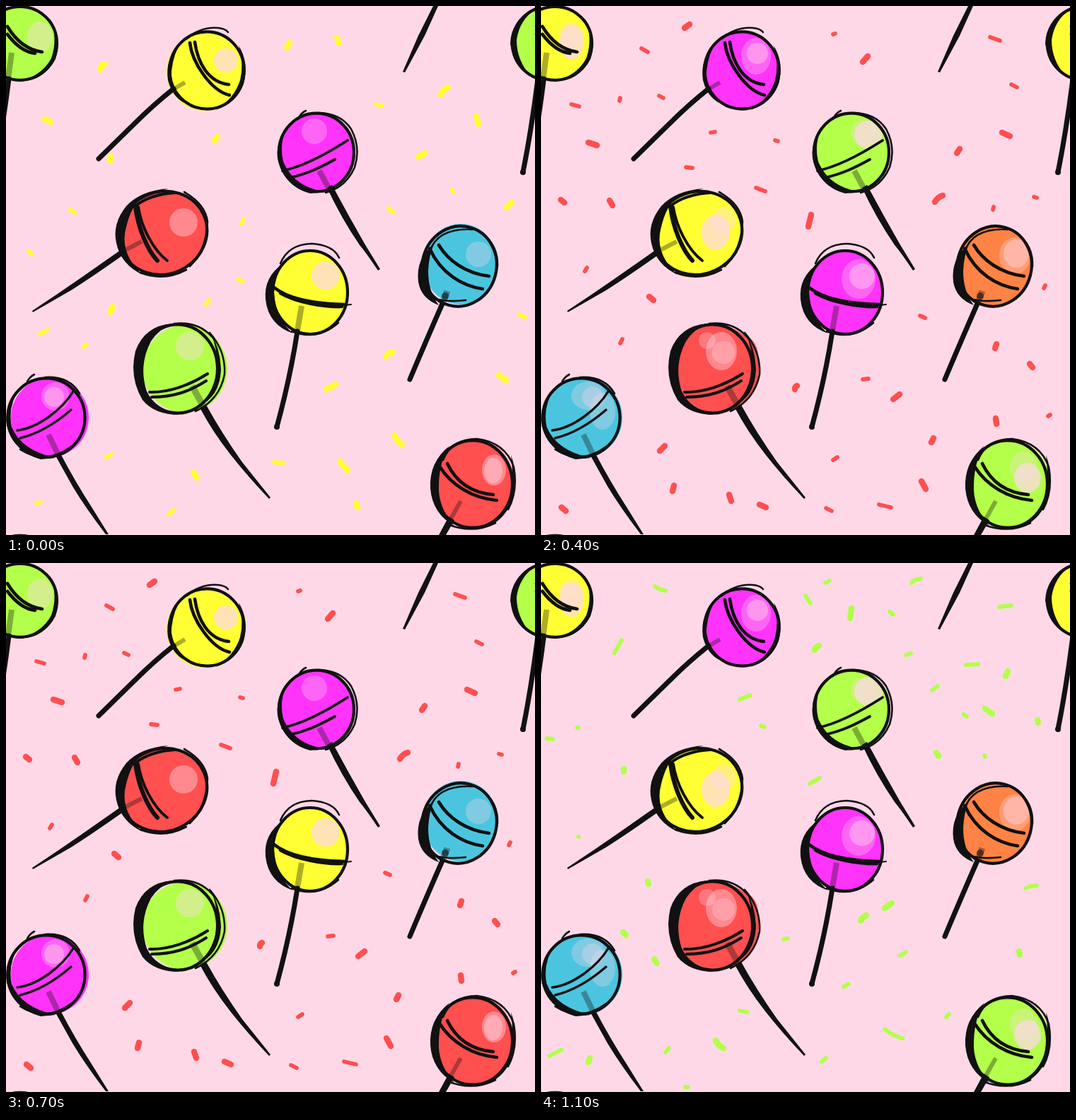
An HTML page that plays this animation: 748 by 748 pixels, repeating every 1200 ms.

```html
<!DOCTYPE html>
<html lang="en">
<head>
<meta charset="utf-8">
<title>Lollipops</title>
<style>
  html, body { margin: 0; width: 100%; height: 100%; overflow: hidden; background: #ffd8e8; }
  svg { display: block; width: 100vw; height: 100vh; }

  .y { --c: #ffff33 } .m { --c: #ff33fa } .r { --c: #ff4f4f }
  .g { --c: #b3ff4a } .b { --c: #4bc5df } .o { --c: #ff8344 }
  .candy use, .candy ellipse { fill: var(--c); }
  .candy .h { fill: #ffd8e8; opacity: .42; }
  .candy .s { fill: #ffd8e8; opacity: .72; }
  .candy .l { fill: #ffd8e8; opacity: .3; }

  .sprinkles { fill: none; stroke: var(--c); stroke-linecap: round; }
  .thick { stroke-width: 8.4; }
  .thin { stroke-width: 5.8; }

  /* each layer shows for one third of its cycle */
  .candy, .sprinkles { visibility: hidden; animation: turn 600ms step-end infinite; }
  .sprinkles { animation-duration: 300ms; }
  .candy.second { animation-delay: -400ms; }
  .candy.third { animation-delay: -200ms; }
  .sprinkles.second { animation-delay: -200ms; }
  .sprinkles.third { animation-delay: -100ms; }
  @keyframes turn {
    0% { visibility: visible; }
    33.3333% { visibility: hidden; }
    100% { visibility: hidden; }
  }

  .line { fill: none; stroke: #111; stroke-linecap: round; stroke-linejoin: round; }
  .solid { fill: #111; }
  .inside { fill: none; stroke: #111; opacity: .34; }
</style>
</head>
<body>
<svg viewBox="0 0 748 748">
  <defs>
    <ellipse id="c1" cx="284" cy="91" rx="54" ry="55"/>
    <ellipse id="c2" cx="440" cy="208" rx="53" ry="55"/>
    <ellipse id="c3" cx="222" cy="321" rx="63" ry="58" transform="rotate(-25 222 321)"/>
    <ellipse id="c4" cx="429" cy="405" rx="54" ry="59"/>
    <ellipse id="c5" cx="641" cy="368" rx="53" ry="57"/>
    <ellipse id="c6" cx="247" cy="513" rx="60" ry="62"/>
    <ellipse id="c7" cx="58" cy="582" rx="55" ry="56"/>
    <ellipse id="c8" cx="662" cy="676" rx="57" ry="62"/>
    <ellipse id="c9" cx="21" cy="52" rx="52" ry="52"/>
  </defs>
  <rect width="748" height="748" fill="#ffd8e8"/>

  <g class="sprinkles first y">
    <path class="thick" d="M133 90q0-6 6-8M397 59l4-7M468 45l3 7M55 160l8 4M147 219l1-6M295 190l4-5M615 125q3-7 10-10M665 156l3 11M583 213l9-5M708 285l7-7M147 433l4-8M537 496q4-6 10-7M697 522l10 7M549 607q3 7 11 13M472 644l11 13M265 659l5 8M495 703l2 6M453 542l13-7"/>
    <path class="thin" d="M523 139l9 2M630 260l3 3M541 286l7 6M91 288l6 4M333 308l3-6M32 346l4 5M328 386l7 4M283 422l4-6M47 464l12-6M110 482l4-3M725 436l9 4M142 638l7-4M379 645l13 1M230 719l7-6M43 704l6-3"/>
  </g>
  <g class="sprinkles second r">
    <path class="thick" d="M203 31l7-5M455 79l7-8M67 193l12 4M652 179l11 5M588 208l4-6M28 274l5 4M97 275l4 7M557 277q4-7 11-9M378 312l4-17M153 411l6 5M642 484l2-6M691 506l4 5M359 542q0-4 3-5M498 556l9-7M643 583l1 8M552 617l3-6M168 629l7-7M538 672l6 11M186 686l2-8M266 691l3 9M309 705l9 4M29 709l6 5"/>
    <path class="thin" d="M142 60l9 5M413 40l3-1M635 44l14 5M665 111l8 4M43 139l11 3M111 134l1-4M167 127l6 3M240 179l6-1M331 190l4 1M205 228l9 1M304 257l13 5M640 284l-1 4M697 270l4 1M62 375l3-5M711 399l2-4M536 438l7 3M112 477l3-6M455 528l8-1M717 580l3-2M413 642l6-4M478 705l17 4M403 710l8 4"/>
  </g>
  <g class="sprinkles third g">
    <path class="thick" d="M437 78l2-14M387 123q1-5 6-6M657 160l3-7M628 206l10 7M702 222l1 4M559 268l3 5M452 506q3-6 8-8M486 488l10-7M151 450l1 4M116 522l4 4M160 560l4 6M676 549l1 5M247 675q3 7 11 11M67 706l2-6M117 291l0 4"/>
    <path class="thin" d="M161 33q6 5 15 6M104 127l10-18M374 46l7 11M402 28l6-3M493 69l5 4M524 28q3-5 13-6M516 130l7-2M648 62l17-2M601 144l17-1M553 180l8-6M597 214l5 3M281 193l15-6M311 230l5 2M51 233l2 0M8 248l9 1M627 272l1 2M380 312l14-8M53 387l.3 0M685 460q8-4 16-4M343 532l6-1M508 555l8-5M428 599l7-4M281 633l11 2M573 642l4-4M486 659q12 10 26 13M12 697l17-9M176 692l5-6M397 705l6-5M204 741l4 0"/>
  </g>

  <g class="candy first">
    <g id="a">
      <use href="#c1" class="y" x="-3" y="2"/><circle class="s" cx="311" cy="77" r="17"/>
      <use href="#c2" class="m"/><circle class="l" cx="436" cy="177" r="18"/>
      <use href="#c3" class="r" x="2"/><circle class="h" cx="251" cy="306" r="20"/>
      <use href="#c4" class="y"/><circle class="s" cx="452" cy="381" r="20"/>
      <use href="#c5" class="b" x="2" y="-3"/><circle class="l" cx="668" cy="351" r="18"/>
      <use href="#c6" class="g" x="6"/><circle class="h" cx="260" cy="481" r="20"/>
      <use href="#c7" class="m" x="4"/><circle class="l" cx="70" cy="552" r="20"/><circle class="h" cx="68" cy="553" r="14"/>
      <use href="#c8" class="r" x="-1" y="-2"/><ellipse class="h" cx="690" cy="656" rx="17" ry="22"/><ellipse class="h" cx="689" cy="657" rx="13" ry="18"/>
      <use href="#c9" class="g"/><ellipse class="h" cx="48" cy="44" rx="18" ry="22"/>
    </g>
    <use href="#a" x="748"/>
  </g>
  <g class="candy second">
    <g id="b">
      <use href="#c1" class="m" x="-4" y="-1"/><ellipse class="s" cx="311" cy="86" rx="17" ry="23"/>
      <use href="#c2" class="o" y="-1"/><ellipse class="h" cx="445" cy="176" rx="22" ry="18"/><ellipse class="h" cx="443" cy="176" rx="16" ry="15"/>
      <use href="#c3" class="g"/><ellipse class="h" cx="252" cy="311" rx="20" ry="27"/><ellipse class="h" cx="253" cy="320" rx="17" ry="18"/>
      <use href="#c4" class="b"/><ellipse class="b" cx="430" cy="365" rx="40" ry="28"/><ellipse class="l" cx="453" cy="386" rx="22" ry="28"/><circle class="l" cx="442" cy="371" r="12"/>
      <use href="#c5" class="g" x="-1" y="6"/><ellipse class="s" cx="667" cy="355" rx="18" ry="23"/>
      <use href="#c6" class="o" x="4"/><circle class="h" cx="252" cy="477" r="20"/><circle class="h" cx="256" cy="479" r="15"/>
      <use href="#c7" class="r"/><ellipse class="l" cx="65" cy="550" rx="25" ry="21"/><circle class="h" cx="67" cy="551" r="16"/>
      <use href="#c8" class="y" x="2" y="1"/><ellipse class="s" cx="692" cy="650" rx="19" ry="22"/>
      <use href="#c9" class="r" x="2"/><ellipse class="h" cx="47" cy="43" rx="18" ry="25"/><ellipse class="h" cx="48" cy="45" rx="14" ry="18"/>
    </g>
    <use href="#b" x="748"/>
  </g>
  <g class="candy third">
    <g id="c">
      <use href="#c1" class="m"/><ellipse class="l" cx="304" cy="71" rx="21" ry="26"/><circle class="h" cx="306" cy="67" r="15"/>
      <use href="#c2" class="g"/><circle class="l" cx="456" cy="179" r="18"/><circle class="s" cx="463" cy="182" r="20"/>
      <use href="#c3" class="y" x="2" y="-1"/><ellipse class="h" cx="258" cy="303" rx="17" ry="18"/><ellipse class="s" cx="247" cy="320" rx="20" ry="25"/>
      <use href="#c4" class="m"/><ellipse class="l" cx="449" cy="386" rx="24" ry="28"/><circle class="h" cx="454" cy="382" r="18"/>
      <use href="#c5" class="o"/><ellipse class="l" cx="670" cy="353" rx="22" ry="26"/><ellipse class="h" cx="672" cy="350" rx="18" ry="20"/>
      <use href="#c6" class="r" x="1"/><ellipse class="r" cx="278" cy="495" rx="29" ry="32"/><circle class="l" cx="235" cy="473" r="12"/><ellipse class="h" cx="255" cy="488" rx="22" ry="27"/><circle class="l" cx="258" cy="490" r="16"/>
      <use href="#c7" class="b" x="2"/><ellipse class="l" cx="67" cy="551" rx="24" ry="20"/><ellipse class="l" cx="87" cy="573" rx="18" ry="26"/><circle class="l" cx="73" cy="553" r="15"/>
      <use href="#c8" class="g" x="1"/><ellipse class="l" cx="682" cy="652" rx="19" ry="22"/><ellipse class="s" cx="688" cy="667" rx="19" ry="21"/>
      <use href="#c9" class="y"/><ellipse class="h" cx="43" cy="41" rx="17" ry="18"/><ellipse class="s" cx="43" cy="52" rx="17" ry="24"/>
    </g>
    <use href="#c" x="748"/>
  </g>

  <g id="ink">
    <g class="inside">
      <path stroke-width="6" d="M233 120L253 108M165 347L192 333M643 700L629 725"/>
      <path stroke-width="8" d="M443 233L456 257M418 424L412 459M60 606L73 633M8 66L3 103"/>
      <path stroke-width="9" d="M263 537L279 566M624 403L617 422"/>
    </g>

    <!-- sticks -->
    <g class="line" stroke-width="7">
      <path d="M237 117Q208 140 181 167L131 216"/>
      <path d="M412 460Q402 525 383 595"/>
      <path d="M617 421Q592 478 571 528"/>
      <path d="M4 103Q-5 175-17 235"/>
    </g>
    <g class="solid">
      <path d="M454 257L461 253Q484 296 507 336L529 372L526 374Q510 350 500 338Q474 300 454 257Z"/>
      <path d="M165 343L170 349Q125 381 92 402L38 433L37 431Q72 408 105 385Z"/>
      <path d="M274 568L283 564Q305 604 334 645L374 695L372 697Q340 663 318 635Q292 602 274 568Z"/>
      <path d="M69 634L76 631Q98 673 122 710L145 747L141 747Q112 709 94 679Z"/>
      <path d="M626 722L634 727L622 748H612Z"/>
      <path d="M604 748H611L592 790L564 842L561 841L583 790Z"/>
      <circle cx="383" cy="595" r="4"/><circle cx="-17" cy="235" r="4"/>
      <circle cx="621" cy="410" r="5" opacity=".6"/>
    </g>

    <!-- heavy shadow edges -->
    <g class="solid">
      <path d="M250 48Q224 72 229 105Q235 128 252 137Q232 113 234 92Q237 65 250 48Z"/>
      <path d="M329 56Q344 80 336 110Q326 138 296 147Q323 131 331 105Q337 80 329 56Z"/>
      <path d="M397 171Q379 195 385 220Q396 256 430 265L455 263Q408 258 392 220Q386 195 397 171Z"/>
      <path d="M230 258Q190 261 170 283Q150 308 156 335Q162 365 193 380Q164 353 168 322Q174 288 190 272Q207 264 230 258Z"/>
      <path d="M392 364Q364 383 367 415Q371 451 406 463Q381 443 379 405Q380 382 392 364Z"/>
      <path d="M605 337Q579 357 583 390Q587 414 612 423Q597 404 597 375Q598 352 605 337Z"/>
      <path d="M235 449Q196 452 183 488Q174 525 193 557Q210 578 245 578Q212 571 199 545Q187 508 205 474Q216 457 235 449Z"/>
      <path d="M291 466Q301 491 297 523Q290 551 272 566Q302 553 304 515Q303 484 291 466Z"/>
      <path d="M20 540Q-3 561 1 593Q12 631 49 641L70 639Q21 628 8 595Q2 565 20 540Z"/>
      <path d="M627 622Q598 645 600 682Q603 718 634 735Q610 708 612 676Q613 643 627 622Z"/>
      <path d="M714 635Q727 670 714 703Q702 730 676 738Q706 722 713 690Q718 662 714 635Z"/>
      <path d="M0 5Q-34 20-35 53Q-31 84-6 99Q-26 77-26 48Q-22 20 0 5Z"/>
      <path d="M62 18Q79 43 70 75Q54 106 16 107Q50 100 64 74Q74 45 62 18Z"/>
    </g>

    <!-- outlines -->
    <g class="line" stroke-width="4.2">
      <ellipse cx="284" cy="91" rx="52.6" ry="54.6"/>
      <ellipse cx="439" cy="207" rx="53" ry="55.4"/>
      <ellipse cx="222" cy="321" rx="63" ry="58" transform="rotate(-25 222 321)"/>
      <ellipse cx="430" cy="405" rx="53" ry="59"/>
      <ellipse cx="641" cy="368" rx="52.5" ry="57" transform="rotate(15 641 368)"/>
      <ellipse cx="243" cy="513" rx="56" ry="62.6"/>
      <ellipse cx="57" cy="582" rx="54.6" ry="55.6"/>
      <ellipse cx="660" cy="676" rx="56" ry="61.6"/>
      <ellipse cx="20" cy="52.8" rx="52" ry="52"/>
    </g>
    <g class="line" stroke-width="2.6">
      <path d="M256 46Q275 29 300 31Q310 32 314 37"/>
      <path d="M413 160Q417 151 424 148M440 151Q473 151 488 174Q502 200 493 228Q481 256 452 264"/>
      <path d="M252 263Q282 280 285 305Q283 346 260 368M190 377Q223 390 255 373"/>
      <path d="M388 364Q399 337 432 336Q463 338 471 356M404 460Q440 474 470 448"/>
      <path d="M599 347Q611 313 660 316M606 414Q626 419 650 416M673 322Q696 338 695 368"/>
      <path d="M238 449Q274 445 295 472M288 462Q311 488 309 521Q302 557 268 573"/>
      <path d="M30 531Q34 524 40 521M55 525Q90 523 104 548M20 627Q56 650 92 623"/>
      <path d="M618 642Q630 612 666 612Q706 617 718 652Q724 686 710 712M625 733Q660 747 692 731"/>
    </g>

    <!-- wrapper bands -->
    <g class="line" stroke-width="4.6">
      <path d="M260 52C263 80 290 120 316 126M267 51C271 80 286 108 315 111"/>
      <path d="M391 233C420 227 455 208 483 190M400 243C425 238 445 228 465 217" stroke-width="3.8"/>
      <path d="M183 284C187 315 200 345 214 360" stroke-width="6"/>
      <path d="M187 284C191 312 208 345 228 360M184 282Q205 266 240 264" stroke-width="4"/>
      <path d="M379 398C400 415 440 421 478 422M388 406C410 419 450 426 475 425"/>
      <path d="M470 424L488 422" stroke-width="2"/>
      <path d="M599 343C615 378 645 396 674 400M612 338C625 360 650 378 683 382"/>
      <path d="M203 546C230 547 260 536 285 520M206 553C235 553 258 546 283 530" stroke-width="4"/>
      <path d="M16 600C45 597 80 570 95 545M20 611C45 605 70 590 92 571" stroke-width="3.4"/>
      <path d="M613 651C630 678 660 696 694 699M624 647C635 670 655 688 689 691"/>
      <path d="M2 40C14 56 26 65 41 67M2 29C14 49 30 62 51 65"/>
    </g>
  </g>
  <use href="#ink" x="748"/>
  <use href="#ink" y="-748"/>
  <use href="#ink" y="748"/>
</svg>
</body>
</html>
```
